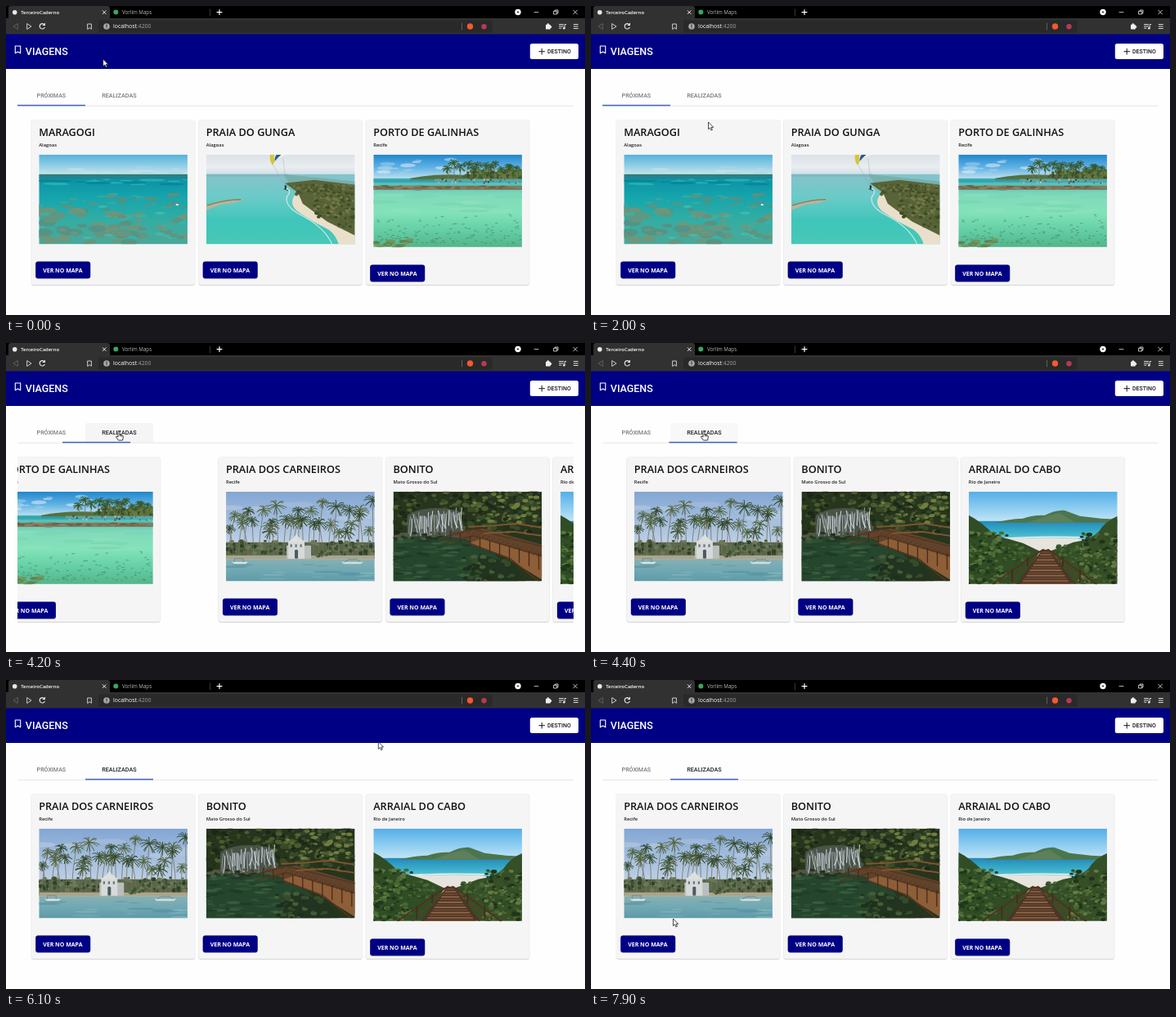
Recreate the animation shown at these times as an HTML page. Size 708 by 378 pixels, loop 8 s.

```html
<!DOCTYPE html>
<html lang="pt">
<head>
<meta charset="utf-8">
<title>Viagens</title>
<style>
html, body { margin: 0; width: 100%; height: 100%; overflow: hidden; background: #fefefe; }
svg { display: block; }
#stage { width: 100vw; height: 100vh; }
text { white-space: pre; }
.ui { font-family: "Open Sans", "Noto Sans", sans-serif; }
.app { font-family: Roboto, Arial, sans-serif; font-weight: 500; }
.line { fill: none; stroke-linecap: round; stroke-linejoin: round; }
</style>
</head>
<body>
<svg id="stage" viewBox="0 0 708 378" preserveAspectRatio="none"></svg>
<script>
const LOOP = 8000, STEP = 100;
const NAVY = '#000084';

let seed = 7;
const rnd = (a = 1, b = 0) => {
  seed = (seed * 16807) % 2147483647;
  return b + (a - b) * seed / 2147483647;
};
const n1 = v => v.toFixed(1);
const repeat = (n, fn) => Array.from({ length: n }, (_, i) => fn(i)).join('');

const rect = (x, y, w, h, fill, r = 0, extra = '') =>
  `<rect x="${x}" y="${y}" width="${w}" height="${h}" rx="${r}" fill="${fill}" ${extra}/>`;
const dot = (x, y, rx, ry, fill, extra = '') =>
  `<ellipse cx="${n1(x)}" cy="${n1(y)}" rx="${n1(rx)}" ry="${n1(ry)}" fill="${fill}" ${extra}/>`;
const shape = (d, fill, extra = '') => `<path d="${d}" fill="${fill}" ${extra}/>`;
const line = (d, color, w = 1, extra = '') =>
  `<path class="line" d="${d}" stroke="${color}" stroke-width="${w}" ${extra}/>`;
const label = (x, y, str, size, fill, cls = 'ui', weight = '') =>
  `<text x="${x}" y="${y}" class="${cls}" font-size="${size}" fill="${fill}" ${weight && `style="font-weight:${weight}"`}>${str}</text>`;
const gradient = (id, ...colors) =>
  `<linearGradient id="${id}" x2="0" y2="1">${colors.map((c, i) =>
    `<stop offset="${i / (colors.length - 1)}" stop-color="${c}"/>`).join('')}</linearGradient>`;

// Ellipses spread at random over a box
const scatter = (n, [x, y, w, h], size, flat, colors, opacity = 1) =>
  `<g opacity="${opacity}">${repeat(n, i => {
    const r = rnd(size, size * .35);
    return dot(rnd(x + w, x), rnd(y + h, y), r, r * flat, colors[i % colors.length]);
  })}</g>`;

const palm = (x, y, h, r, lean, green = '#3b5230', trunk = '#77705f') => {
  const cx = x + lean, cy = y - h;
  const fronds = repeat(13, i => {
    const a = i * Math.PI * 2 / 13 + rnd(.25, -.25), len = r * rnd(1, .7);
    const dx = Math.cos(a) * len, dy = Math.sin(a) * len;
    return `M${n1(cx)} ${n1(cy)}q${n1(dx * .6)} ${n1(dy * .7 - r * .15)} ${n1(dx)} ${n1(dy * .8 + r * .15)}`;
  });
  return line(`M${n1(x)} ${y}Q${n1(x + lean * .2)} ${n1(y - h / 2)} ${n1(cx)} ${n1(cy)}`, trunk, .8) +
    line(fronds, green, 1);
};

function reefPhoto() {
  return rect(0, 0, 182, 26, 'url(#reefSky)') + rect(0, 25, 182, 85, 'url(#reefSea)') +
    scatter(14, [0, 15, 182, 8], 14, .12, ['#c9e4ec', '#a9d7e8'], .6) +
    rect(0, 24, 182, 1.6, '#3e7767') + rect(0, 27, 182, 2, '#2f7f84') +
    scatter(20, [0, 29, 182, 8], 17, .1, ['#0b7f92', '#32b9b4'], .7) +
    scatter(34, [0, 48, 182, 16], 8, .24, ['#5a907f', '#6b8f76', '#38aaa4'], .85) +
    scatter(55, [0, 66, 130, 42], 11, .4, ['#6f9178', '#7d9272', '#5c8e7f'], .8) +
    scatter(22, [90, 74, 92, 34], 8, .4, ['#698e77', '#37b3a8', '#809372'], .8) +
    scatter(16, [0, 62, 182, 46], 7, .3, ['#35b6aa', '#46bcae'], .8) +
    shape('M168 60l3 1-1 1.5-3-.5z', '#e7f1e7');
}

function beachPhoto() {
  return rect(0, 0, 182, 30, 'url(#coastSky)') + rect(0, 24, 182, 86, 'url(#coastSea)') +
    shape('M0 24H100V27H0z', '#7fb9c2') +
    shape('M95 24L182 33V80L105 43z', '#77b0ad') +
    shape('M94 35Q110 38 112 45Q99 58 111 69Q129 82 150 92Q159 99 162 110H182V70L110 38z', '#eadfca') +
    line('M95 40Q106 43 99 51Q95 61 112 72Q145 88 154 110', '#e8f6ee', 1.2, 'opacity=".8"') +
    shape('M96 35L132 31L182 37V99L148 82L118 60L112 46z', '#596438') +
    scatter(150, [108, 37, 72, 13], 2.6, .7, ['#4f5b31', '#6e7442', '#404e2b']) +
    scatter(110, [130, 50, 50, 27], 2.8, .7, ['#52602f', '#747846', '#3c4b29']) +
    scatter(22, [162, 75, 20, 14], 2.3, .8, ['#52602f', '#3c4b29']) +
    shape('M0 62Q20 53 47 54Q36 60 18 61L0 68z', '#b9b59a') +
    line('M2 62Q23 55 42 55', '#7d8468', 1.5) +
    line('M80 9L97 40M94 5L98 40', '#909ca1', .35) +
    shape('M78 0Q77 8 81 13Q83 4 99 0z', '#f5f5e5') +
    shape('M78 0Q77 8 81 13L84 8Q82 4 84 0z', '#d4c53a') +
    shape('M86 0Q83 4 84 8Q88 3 92 0z', '#285a91') +
    dot(97, 40, 1.3, 2.7, '#26383e') + line('M95 42l5 2', '#26383e', .8);
}

function poolPhoto() {
  return rect(0, 0, 182, 32, 'url(#poolSky)') + rect(0, 29, 182, 84, 'url(#poolSea)') +
    scatter(18, [0, 6, 130, 17], 10, .25, ['#bfe0f3', '#e6f0f4', '#a1d1ef'], .55) +
    shape('M45 29Q75 23 110 25L182 18V32H45z', '#55703b') +
    scatter(80, [110, 19, 72, 10], 3, .8, ['#45622c', '#6a793a', '#344d26']) +
    repeat(13, i => palm(92 + i * 7, 30, rnd(21, 11), rnd(8, 5), rnd(4, -4), '#37572a')) +
    rect(75, 30, 107, 3, '#d9c39d') + rect(0, 30, 182, 4, '#2d9eb0', 0, 'opacity=".75"') +
    scatter(32, [75, 30, 105, 5], 1.2, 1.1, ['#744c3a', '#d9b69a', '#394c43']) +
    rect(0, 38, 182, 5, '#806f51') +
    scatter(60, [0, 38, 182, 5], 6, .18, ['#655d46', '#988365', '#788a70']) +
    scatter(20, [0, 46, 182, 26], 25, .1, ['#8fe2bb', '#77d5b1'], .6) +
    scatter(16, [0, 103, 45, 10], 6, .4, ['#627d49', '#779356'], .85) +
    repeat(125, () => {
      const x = rnd(180), y = 73 + 36 * Math.sqrt(rnd());
      return line(`M${n1(x)} ${n1(y)}l${n1(rnd(3, 1))} ${n1(rnd(1, -1))}`, '#447f68', .65);
    });
}

function chapelPhoto() {
  return rect(0, 0, 182, 85, 'url(#chapelSky)') +
    scatter(14, [0, 15, 182, 32], 18, .2, ['#c3d2e3', '#afc4dd'], .45) +
    rect(0, 62, 182, 20, '#596748') +
    scatter(120, [0, 60, 182, 18], 3.5, .8, ['#3c5230', '#6c7a58', '#2d4127']) +
    repeat(30, i => palm(3 + i * 6.1, 78, rnd(68, 27), rnd(13, 8), rnd(8, -8), i % 2 ? '#33482a' : '#52633d')) +
    rect(0, 78, 182, 5, '#a9a58d') + rect(0, 83, 182, 27, 'url(#chapelSea)') +
    rect(74, 66, 30, 16, '#b9bfbf') + rect(76, 60, 20, 22, '#d6dad8') +
    shape('M76 62Q81 58 83 56L86 52L89 56Q92 58 96 62z', '#dde1de') +
    rect(84, 71, 4, 11, '#4c5a63', 1.5) +
    repeat(3, i => rect(78.5 + i * 6, 64.5, 2.2, 3.4, '#66757d')) +
    scatter(12, [104, 72, 20, 8], 3, .8, ['#3c5230', '#62714e']) +
    scatter(22, [0, 87, 182, 22], 18, .07, ['#78aeb6', '#548e9e', '#91bcc0'], .6) +
    shape('M7 86h20l-3 2.5H10z', '#d9e4df') + shape('M141 86h27l-3 2.5h-21z', '#d4ddda') +
    line('M10 86V82H21V86M145 86l5-3h10l4 3', '#607f86', .7);
}

function waterfallPhoto() {
  const steps = repeat(18, i => `M${85 + i * 5.7} ${n1(49 + i * 1.9)}l5 -4`);
  return rect(0, 0, 182, 110, '#27351d') +
    scatter(260, [0, 0, 182, 50], 4.5, .7, ['#22311a', '#384b27', '#4b5b2f', '#1b2817']) +
    scatter(90, [95, 0, 87, 38], 3.8, .6, ['#536833', '#31462a', '#707d3f']) +
    shape('M17 29Q38 15 79 23L92 57L75 61L17 56z', '#4b5347') +
    repeat(38, i => {
      const x = 21 + i * 1.7, y = 29 - i * .16;
      return line(`M${n1(x)} ${n1(rnd(y + 6, y - 4))}q${n1(rnd(3, -3))} 13 ${n1(rnd(6, -3))} ${n1(rnd(29, 14))}`,
        i % 3 ? '#d7e0e8' : '#98aab6', rnd(1.4, .5), 'opacity=".85"');
    }) +
    shape('M0 60Q35 50 83 57L125 77L152 110H0z', '#26452d') +
    scatter(60, [0, 60, 95, 48], 10, .2, ['#315a39', '#1d3626', '#416947'], .65) +
    scatter(34, [0, 50, 65, 8], 4, .5, ['#24301d', '#4f5842']) +
    shape('M70 50L110 45L182 65V103L145 83L98 63z', '#61432b') +
    shape('M110 57L182 80V108L137 80L92 63z', '#8d5e37') +
    line(steps, '#51341f', .8) +
    line('M57 57L98 46L182 67M60 64L98 54L182 79M95 64L143 82L178 110', '#54351f', 1.6) +
    line('M92 43L117 42L150 39L182 44M111 51L148 49L182 54', '#855632', 1.8) +
    line(repeat(10, i => `M${70 + i * 12} ${n1(48 + i * 3.1)}v${10 + i}`), '#432b1b', 1.3) +
    shape('M106 76L148 90L162 110H90z', '#22331f') +
    scatter(50, [85, 77, 60, 33], 4.5, .6, ['#334c2b', '#1e2f1b', '#435d36']);
}

function stairsPhoto() {
  const plank = i => {
    const half = 4 + i * 2.1, y = 74 + i * 3.2;
    return line(`M${n1(94 - half)} ${n1(y)}H${n1(94 + half)}`, i % 2 ? '#91694b' : '#70492f', 1.7);
  };
  return rect(0, 0, 182, 40, 'url(#capeSky)') + rect(0, 36, 182, 28, 'url(#capeSea)') +
    shape('M31 38Q52 33 66 33Q80 28 93 29Q106 22 117 23L136 30L162 33L182 34V38z', '#4c754e') +
    shape('M72 38L92 31L111 26L130 38z', '#5d805a') +
    shape('M27 60Q67 55 132 57L153 64L120 74L65 72z', '#e6e4dc') +
    line('M33 58Q83 54 137 56', '#f4f8f6', 1.4) +
    shape('M0 29Q16 37 31 53L66 63L87 73L63 113H0z', '#314d25') +
    shape('M182 30Q167 36 159 49Q149 59 128 62L99 73L129 113H182z', '#354f27') +
    scatter(150, [0, 50, 48, 62], 3.8, .65, ['#294620', '#486a32', '#1f371a', '#5d773f']) +
    scatter(60, [39, 65, 36, 20], 3.2, .6, ['#294620', '#4a6935', '#36562a']) +
    scatter(150, [135, 50, 47, 61], 3.8, .65, ['#304a24', '#4b6633', '#20331a', '#657b43']) +
    scatter(60, [108, 66, 32, 20], 3.2, .6, ['#2d4824', '#4c6a36', '#3a592c']) +
    shape('M90 71H98L131 113H58z', '#4c3526') + repeat(13, plank) +
    line('M91 71L72 83L30 113M97 71L115 83L156 113', '#51331f', 2.1) +
    line('M90 74L68 94L48 113M99 74L121 94L142 113', '#5e3b26', 1.4) +
    line('M72 81V91M53 95V110M115 81V91M136 96V111', '#452c1d', 1.8);
}

function card(i, title, place, photo) {
  const x = 31 + i * 204.5, drop = i === 2 ? 4 : 0;
  return rect(x, 140, 200, 202, '#c9c9c9', 3) + rect(x - .4, 139.6, 200.8, 202, '#e4e4e4', 3) +
    rect(x, 139.3, 200, 201.7, '#f5f5f5', 3) +
    label(x + 9.2, 158.7, title, 12.7, '#111', 'ui', 600) +
    label(x + 9.2, 172.3, place, 5.8, '#202020', 'ui', 600) +
    `<svg x="${x + 9.3}" y="181.8" width="181.6" height="${109.5 + drop}" overflow="hidden">${photo()}</svg>` +
    rect(x + 5.2, 313.2 + drop, 67, 20.7, '#b9b9c4', 3) +
    rect(x + 5.2, 312.5 + drop, 67, 20.7, NAVY, 3) +
    label(x + 14.2, 325.6 + drop, 'VER NO MAPA', 7, '#fff', 'ui', 700);
}

function browserBar() {
  return rect(0, 0, 708, 15, '#000') + rect(0, 15, 708, 20, '#313131') +
    shape('M3 15V3Q3 0 6 0H124Q127 0 127 3V15z', '#313131') +
    dot(10.7, 7.7, 2.8, 2.8, '#e8e8e8') + dot(134.3, 7.5, 3, 3, '#3ba55c') +
    label(18.2, 9.9, 'TerceiroCaderno', 5.9, '#fff', 'ui', 600) +
    label(142, 9.9, 'Vorlim Maps', 6.2, '#b9b9b9') +
    line('M118.3 5.8l3.8 3.8m0-3.8l-3.8 3.8', '#eee', 1) +
    line('M249.5 4V12', '#444', .8) + line('M258 7.6h6M261 4.6v6', '#fff', 1.2) +
    dot(626, 7.5, 3.7, 3.7, '#fff') + shape('M624.3 6.8h3.4l-1.7 2z', '#111') +
    line('M646 7.7h5M693.7 5.2l4.8 4.8m0-4.8l-4.8 4.8M670 6.3h3.7v3.7H670zM671.2 6.2V5H675V8.8h-1.2', '#eee', .8) +
    line('M14 21.8L9 25L14 28.2z', '#666', .9) + line('M26 21.8L31 25L26 28.2z', '#ddd', .9) +
    line('M47 23A3.2 3.2 0 1 0 47.2 26.3M47.4 21.4V23.5H45.2', '#eee', 1.1) +
    line('M100 22H104.4V28.3L102.2 26.6L100 28.3z', '#ddd', .9) +
    rect(113, 17.5, 481.5, 15, '#292929', 2) +
    dot(123, 25, 3.8, 3.8, '#a8a8a8') + line('M123 23V25.4M123 27v.1', '#202020', 1) +
    label(131, 27.4, 'localhost<tspan fill="#a0a0a0">:4200</tspan>', 6.9, '#fff') +
    line('M557.5 21V29', '#777', .7) +
    dot(567.5, 25, 3.7, 3.7, '#f4582e') + dot(584.5, 25.2, 3.2, 3.2, '#b53a55') +
    rect(660, 22.7, 5.8, 5.8, '#eee', .8) + dot(662.8, 22.6, 1.3, 1.3, '#eee') + dot(666, 25.6, 1.3, 1.3, '#eee') +
    line('M676.5 22.5h5M676.5 24.8h5M676.5 27.1h2.5M683.2 27V22.5h1.6', '#eee', .9) + dot(682.3, 27.2, 1.2, 1.2, '#eee') +
    line('M694.3 22.5h5M694.3 25h5M694.3 27.5h5', '#eee', .9);
}

const upcoming = [['MARAGOGI', 'Alagoas', reefPhoto], ['PRAIA DO GUNGA', 'Alagoas', beachPhoto], ['PORTO DE GALINHAS', 'Recife', poolPhoto]];
const visited = [['PRAIA DOS CARNEIROS', 'Recife', chapelPhoto], ['BONITO', 'Mato Grosso do Sul', waterfallPhoto], ['ARRAIAL DO CABO', 'Rio de Janeiro', stairsPhoto]];
const cards = list => list.map((item, i) => card(i, ...item)).join('');

const $ = id => document.getElementById(id);
$('stage').innerHTML = `<defs>
  ${gradient('reefSky', '#55b2dc', '#8fcce4', '#d0e8ec')}${gradient('reefSea', '#078fa4', '#16a6ad', '#35ada2', '#4ca798')}
  ${gradient('coastSky', '#dbe1e8', '#e8edf0', '#c5d9df')}${gradient('coastSea', '#87c2ca', '#69cbc8', '#3fc5ba', '#48c8b7')}
  ${gradient('poolSky', '#2186cd', '#62b3e5', '#d1e8ee')}${gradient('poolSea', '#43b5b8', '#82dabb', '#82e2b9', '#65cfa5', '#53b58a')}
  ${gradient('chapelSky', '#83a6d3', '#a9c2df', '#d3deea')}${gradient('chapelSea', '#86b0b3', '#6fa8b3', '#5f9aa7')}
  ${gradient('capeSky', '#55aee8', '#8ccdf1', '#cfeaf5')}${gradient('capeSea', '#2489b8', '#3bb0cb', '#8bd3d8')}
  <clipPath id="pageClip"><rect x="14" y="124" width="680" height="230"/></clipPath>
</defs>
${rect(0, 0, 708, 378, '#fefefe')}${browserBar()}
${rect(0, 34.5, 708, 42.5, NAVY)}
${line('M11.3 49H17.7V57.7L14.5 56L11.3 57.7z', '#fff', 1.1)}
${label(23.8, 60, 'VIAGENS', 12.5, '#fff', 'app')}
${rect(640.8, 46, 59.2, 19, '#fff', 2.5, 'id="addPlain"')}
${rect(639.9, 46.3, 59.4, 18.8, NAVY, 2.5, 'id="addHover" stroke="#fff" stroke-width=".8"')}
<g id="addLabel">${line('M651.8 55.7h6.8M655.2 52.3v6.8', 'currentColor', 1)}${label(662, 58.2, 'DESTINO', 7, 'currentColor', 'app')}</g>
${rect(97, 98, 83, 24, '#000', 0, 'id="ripple"')}
${rect(14, 121.7, 680, .8, '#e0e0e0')}
<g opacity=".6">${label(37.6, 111.6, 'PRÓXIMAS', 7.1, '#222', 'app')}</g>
<g id="tabVisited">${label(117.2, 111.6, 'REALIZADAS', 7.25, '#222', 'app')}</g>
${rect(14, 120.8, 83, 1.5, '#4462bb', 0, 'id="ink"')}
<g clip-path="url(#pageClip)"><g id="pages">${cards(upcoming)}<g transform="translate(680)">${cards(visited)}</g></g></g>
<g id="arrow">${shape('M0 0V8.7L2 6.9L3.4 10L4.9 9.4L3.5 6.4H6.2z', '#fff', 'stroke="#111" stroke-width=".75"')}</g>
<g id="hand">${shape('M-1 1Q0 -.8 1 1V4.8L4.6 5.7Q5.6 6 5.3 7.5L4.6 11.5H-.5L-3.3 7.8Q-3.6 6.2 -2 6.7L-1 7.6z', '#fff', 'stroke="#111" stroke-width=".8" stroke-linejoin="round"')}${line('M1 5v1.6M2.5 5.3v1.5M3.9 5.7v1.3', '#111', .5)}</g>`;

const clamp = v => Math.max(0, Math.min(1, v));
const smooth = v => v * v * (3 - 2 * v);

// cubic-bezier(.35, 0, .25, 1), solved by bisection
function slide(x) {
  let lo = 0, hi = 1;
  for (let i = 0; i < 24; i++) {
    const s = (lo + hi) / 2, q = 1 - s;
    if (3 * q * q * s * .35 + 3 * q * s * s * .25 + s ** 3 < x) lo = s; else hi = s;
  }
  return smooth(lo);
}

const route = [
  [0, 118.7, 65], [500, 127, 96], [1200, 143.5, 142], [2200, 143.5, 142], [2800, 143.5, 99],
  [3100, 143.5, 95], [3800, 138, 107.5], [4400, 138, 107.5], [5100, 87.8, 111.8], [5500, 87.8, 111.8],
  [6500, 655, 56], [7100, 663, 47.8], [7400, 660, 52], [7900, 100.5, 292]
];

function pointer(t) {
  const i = Math.max(1, route.findIndex(p => p[0] >= t));
  const [t0, x0, y0] = route[i - 1], [t1, x1, y1] = route[i];
  const k = smooth((t - t0) / (t1 - t0));
  return [x0 + (x1 - x0) * k, y0 + (y1 - y0) * k];
}

const SWITCH = 3983;
const show = (id, on) => $(id).setAttribute('display', on ? 'inline' : 'none');

function draw(t) {
  const k = slide(clamp((t - SWITCH) / 500));
  $('ink').setAttribute('x', 14 + 83 * k);
  $('pages').setAttribute('transform', `translate(${-680 * k})`);
  $('tabVisited').setAttribute('opacity', t > SWITCH ? 1 : .6);
  $('ripple').setAttribute('opacity', t > SWITCH ? .035 * clamp((4600 - t) / 300) : 0);

  const [x, y] = pointer(t);
  const inside = (l, top, r, b) => x >= l && x <= r && y >= top && y <= b;
  const overAdd = inside(640, 46, 700, 65);
  const linked = overAdd || inside(14, 98, 180, 122);
  show('addPlain', !overAdd);
  show('addHover', overAdd);
  $('addLabel').setAttribute('color', overAdd ? '#fff' : '#161616');
  for (const id of ['arrow', 'hand']) {
    $(id).setAttribute('transform', `translate(${x} ${y})`);
    show(id, (id === 'hand') === linked);
  }
}

const start = performance.now();
function tick(now) {
  const t = Math.max(0, now - start) % LOOP;
  draw(Math.floor(t / STEP) * STEP);
  requestAnimationFrame(tick);
}
draw(0);
requestAnimationFrame(tick);
</script>
</body>
</html>
```
